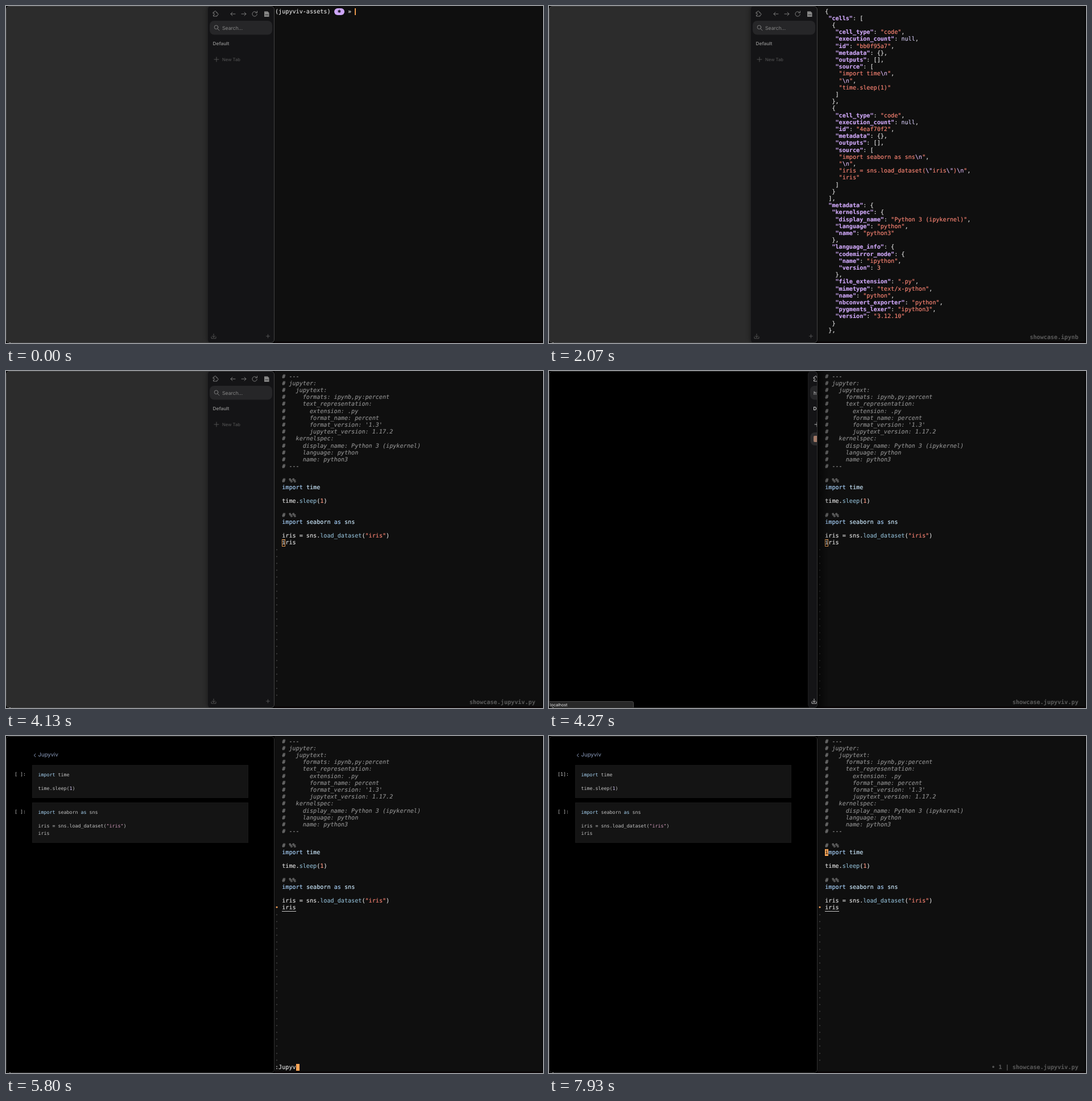
These frames come from a looping animation (944x593 px, 8000 ms). An HTML page:

```html
<!DOCTYPE html>
<html lang="en">
<head>
<meta charset="utf-8">
<title>Notebook beside an editor</title>
<style>
html, body { margin: 0; width: 100%; height: 100%; overflow: hidden; background: #000; }
body { position: relative; text-rendering: geometricPrecision; }
div, pre, svg { position: absolute; margin: 0; box-sizing: border-box; }
i { font-style: normal; }

/* browser window */
#web { left: 0; top: 0; width: 472px; height: 593px; border-radius: 6px; overflow: hidden; background: #2c2c2c; }
#web.on { background: #000; }
#frame { inset: 0; border: 1px solid #424242; border-radius: 6px; }
#web.on #frame { border-color: #303030; }
#glint { left: 6px; top: 592px; width: 2px; height: 1px; background: #aaa; }
#side { left: 354px; top: 0; width: 118px; height: 593px; background: #141416; border-radius: 6px;
  border-left: 1px solid #222224; box-shadow: 0 0 9px rgba(0,0,0,.45); }
#side svg { left: -1px; top: 0; font-family: Inter, "Open Sans", sans-serif; color: #868686; }
#side text { fill: currentColor; }
#side .line { fill: none; stroke: currentColor; stroke-width: .9; stroke-linecap: round; stroke-linejoin: round; }
#side .dim { color: #585858; }
#web.on #side svg, #web.on #side .dim { color: #d0d0d0; }
.active { visibility: hidden; }
#web.on .active { visibility: visible; }
#web.on .idle { visibility: hidden; }
#status { left: 0; top: 581px; width: 149px; height: 13px; border: 1px solid #484848; border-radius: 0 3px 0 0;
  background: #282828; color: #eee; font: 7.1px/11px Inter, sans-serif; padding-left: 1px; }

/* notebook page */
#page { inset: 0; color: #c4c4c4; font: 8.3px/12.4px "DejaVu Sans Mono", "Liberation Mono", monospace; }
#page svg { left: 48px; top: 29px; }
#title { left: 56.5px; top: 28px; font: 9.6px/12px Inter, sans-serif; color: #8c9dbe; }
.cell { left: 46px; width: 380px; background: #141414; border: 1px solid #181818; }
.cell pre { left: 9.5px; top: 9.5px; font: inherit; }
.prompt { left: 15px; white-space: pre; }
#page .k { color: #a9d6f7; }
#page .s { color: #d09bbb; }
#page .n { color: #cfc4ee; }
#page .f, #page .m { color: inherit; }

/* terminal: text sits a little lower than the cell it belongs to */
#term { left: 472px; top: 0; width: 472px; height: 593px; background: #0f0f0f; color: #e2e2e2; overflow: hidden;
  border-right: 2px solid #070707; --drop: .9px; -webkit-text-stroke: .15px;
  font: 10.13px/12.2px "DejaVu Sans Mono", "Liberation Mono", monospace; }
#term > div, #term > pre { left: calc(1px + var(--c, 0) * 6.1px); top: calc(3.6px + var(--drop) + var(--r, 0) * 12.2px);
  font: inherit; white-space: pre; }
#term > .box { --drop: 0px; height: 12.2px; }
#term > #floor { left: 0; top: 590px; width: 472px; height: 3px; background: #0a0607; }
#term > #shade { left: 0; top: 0; width: 20px; height: 593px; background: linear-gradient(90deg, rgba(0,0,0,.6), transparent); }
#term .pill { width: 18.3px; border-radius: 6.1px; background: #cda6f8; color: #18121f; text-align: center; font-size: 9.5px; }
#term .bar { width: 1.5px; background: #e8974c; }
#term .name { left: auto; right: 11.5px; color: #565656; font-weight: bold; }
.block { background: #ffa656; color: #151515; }
#cursor { padding-top: .9px; }
#cmd + .block { display: inline-block; width: 6.1px; height: 12.2px; margin-top: -.9px; vertical-align: top; }
#term .hollow { width: 6.1px; border: 1px solid #d99450; }
.key { color: #cfa8f8; font-weight: bold; }
.s { color: #fc8574; }
.e { color: #d8b4ee; }
.nul { color: #cfc6ee; }
.n { color: #ff9c85; }
.k { color: #a8d2fb; }
.m { color: #cdeaff; }
.f { color: #8bb4cb; }
.c { color: #8f8f8f; font-style: italic; }
#term .dots { color: #5a5a5a; }
#term .dot { color: #f2a158; }
#term .warn { width: 24.4px; border-bottom: 1px solid #c8c8c8; }
</style>
</head>
<body>
<div id="web">
  <div id="page" data-at="4330 8000">
    <svg width="6" height="10"><path d="M4 2 1.5 5 4 8" fill="none" stroke="#8c9dbe"/></svg>
    <div id="title">Jupyviv</div>
    <div class="prompt" id="run" style="top:61.3px"></div>
    <div class="cell" style="top:51px;height:58px"><pre data-py="15"></pre></div>
    <div class="prompt" style="top:127.3px">[ ]:</div>
    <div class="cell" style="top:117px;height:71px"><pre data-py="20"></pre></div>
  </div>
  <div id="side">
    <svg width="118" height="593">
      <rect x="4" y="26" width="110" height="24.5" rx="8" fill="#262628"/>
      <g class="line">
        <path d="M10.500 11h1.700a1.600 1.600 0 1 1 3 0h1.800v2a1.600 1.600 0 1 1 0 3v2h-6.500v-2.200a1.500 1.500 0 1 0 0-2.600z"/>
        <path d="M49 14h-8m3-3-3 3 3 3M60 14h8m-3-3 3 3-3 3"/>
        <path d="M86.500 11.500a4.200 4.200 0 1 0 .8 3M87.500 9v3h-3"/>
        <path class="dim" d="M12 94h8m-4-4v8"/>
        <path class="dim" d="M11 577v6m-2.500-2.500 2.500 2.500 2.500-2.500M7 582v3h8v-3M103.500 581h6m-3-3v6"/>
        <g class="idle"><circle cx="15.500" cy="37.300" r="3.300"/><path d="m18 40 3 3"/></g>
      </g>
      <path d="M100 9.500h6l2.500 2.500v7H100z" fill="currentColor"/>
      <path d="M101.500 15.500h5.500" stroke="#333"/>
      <text class="idle" x="26" y="41.500" font-size="8.7">Search...</text>
      <text class="active" x="10" y="41.500" font-size="8.7">http://localhost</text>
      <text x="9.500" y="69" font-size="8.3" font-weight="600">Default</text>
      <text class="dim" x="26" y="97" font-size="7.7">New Tab</text>
      <g class="active">
        <rect x="4.500" y="108" width="110" height="23" rx="8" fill="#2a2a2c"/>
        <rect x="10" y="114" width="11" height="11" rx="2" fill="#a47b69"/>
        <text x="26" y="122.500" font-size="7.7">Jupyviv</text>
      </g>
    </svg>
  </div>
  <div id="status" data-at="4190 4330">localhost</div>
  <div id="frame"></div>
  <div id="glint"></div>
</div>

<div id="term">
  <div id="floor"></div>
  <div data-at="0 1870">(jupyviv-assets)</div>
  <div data-at="0 1870" class="box pill" style="--c:17">✱</div>
  <div data-at="0 1870" style="--c:21">»</div>
  <div data-at="0 1870" style="--c:23" id="shell"></div>
  <div data-at="0 100 530 1870" class="box bar" id="bar"></div>

  <pre data-at="1870 3670" style="--c:2" id="json"></pre>
  <div data-at="1870 2580" class="name" style="--r:47">showcase.ipynb</div>

  <pre data-at="3670 8000" style="--c:2" id="code"></pre>
  <pre data-at="3670 8000" style="--r:25" class="dots" id="dots"></pre>
  <div data-at="3670 4600" class="name" style="--r:47">showcase.jupyviv.py</div>
  <div data-at="4600 5600 6470 8000" class="name" style="--r:47">• 1 | showcase.jupyviv.py</div>
  <div data-at="4600 8000" class="dot" style="--r:24">•</div>
  <div data-at="4600 8000" class="box warn" style="--c:2;--r:24"></div>

  <div data-at="4070 4870" class="box hollow" style="--c:2;--r:24"></div>
  <div data-at="3670 4070 4870 5600 6470 8000" class="box block" style="--c:2" id="cursor"></div>
  <div data-at="2580 3670 5600 6470" style="--r:47"><span id="cmd"></span><span class="block"></span></div>
  <div id="shade" data-at="4190 4870"></div>
</div>

<script>
const LOOP = 8000;
const $ = id => document.getElementById(id);

const py = `# ---
# jupyter:
#   jupytext:
#     formats: ipynb,py:percent
#     text_representation:
#       extension: .py
#       format_name: percent
#       format_version: '1.3'
#       jupytext_version: 1.17.2
#   kernelspec:
#     display_name: Python 3 (ipykernel)
#     language: python
#     name: python3
# ---

# %%
import time

time.sleep(1)

# %%
import seaborn as sns

iris = sns.load_dataset("iris")
iris`.split("\n");

const cell = (id, source) =>
  ({ cell_type: "code", execution_count: null, id, metadata: {}, outputs: [], source });
const notebook = {
  cells: [
    cell("bb0f95a7", ["import time\n", "\n", "time.sleep(1)"]),
    cell("4eaf70f2", ["import seaborn as sns\n", "\n", "iris = sns.load_dataset(\"iris\")\n", "iris"]),
  ],
  metadata: {
    kernelspec: { display_name: "Python 3 (ipykernel)", language: "python", name: "python3" },
    language_info: {
      codemirror_mode: { name: "ipython", version: 3 },
      file_extension: ".py", mimetype: "text/x-python", name: "python",
      nbconvert_exporter: "python", pygments_lexer: "ipython3", version: "3.12.10",
    },
  },
  nbformat: 4,
};

// Wraps each match in the class that belongs to its capture group.
const mark = (text, re, names) => text.replace(re, (m, ...g) =>
  `<i class="${names[g.findIndex(x => x !== undefined)]}">${m}</i>`);

const markPy = line => line[0] === "#"
  ? `<i class="c">${line}</i>`
  : mark(line, /("[^"]*")|\b(import|as)\b|(sleep|load_dataset)|(\d)|(?<=import |as )(\w+)/g, ["s", "k", "f", "n", "m"]);

const markJson = line =>
  mark(line, /("\w+")(?=:)|("(?:\\.|[^"\\])*")|(null)|(\d+)/g, ["key", "s", "nul", "n"])
    .replace(/\\./g, '<i class="e">$&</i>');

$("json").innerHTML = JSON.stringify(notebook, null, 1).split("\n").slice(0, 47).map(markJson).join("\n");
$("code").innerHTML = py.map(markPy).join("\n");
$("dots").textContent = "·\n".repeat(22);
for (const el of document.querySelectorAll("[data-py]")) {
  const from = +el.dataset.py + 1, end = py.indexOf("# %%", from);
  el.innerHTML = py.slice(from, end < 0 ? py.length : end - 1).map(markPy).join("\n");
}

const timed = [...document.querySelectorAll("[data-at]")].map(el => [el, el.dataset.at.split(" ").map(Number)]);
const clamp = (v, lo, hi) => Math.min(hi, Math.max(lo, v));
const typed = (text, t, start, gap) => text.slice(0, clamp(Math.floor((t - start) / gap) + 1, 0, text.length));

function draw(t) {
  for (const [el, at] of timed) {
    const on = at.filter(x => x <= t).length % 2;
    el.style.visibility = on ? "visible" : "hidden";
  }

  const shell = typed("nvim showcase.ipynb", t, 670, 43);
  $("shell").textContent = shell;
  $("bar").style.setProperty("--c", 23 + shell.length);

  $("cmd").textContent = t < 4000
    ? typed(":JupyvivStart", t, 2580, 33)
    : typed(":JupyvivRunHere", t, 5600, 37);

  const row = 24 - clamp(Math.floor((t - 5000) / 40), 0, 8);
  $("cursor").style.setProperty("--r", row);
  $("cursor").textContent = py[row][0] || " ";

  const slide = 1 - (1 - clamp((t - 4190) / 170, 0, 1)) ** 3;
  $("web").classList.toggle("on", t >= 4190);
  $("side").style.transform = `translateX(${slide * 118}px)`;
  $("side").style.opacity = slide < 1 ? 1 : 0;

  $("run").textContent = t < 6530 ? "[ ]:" : t < 7530 ? "[*]:" : "[1]:";
}

const start = performance.now();
function tick() {
  draw((performance.now() - start) % LOOP);
  requestAnimationFrame(tick);
}
tick();
</script>
</body>
</html>
```
